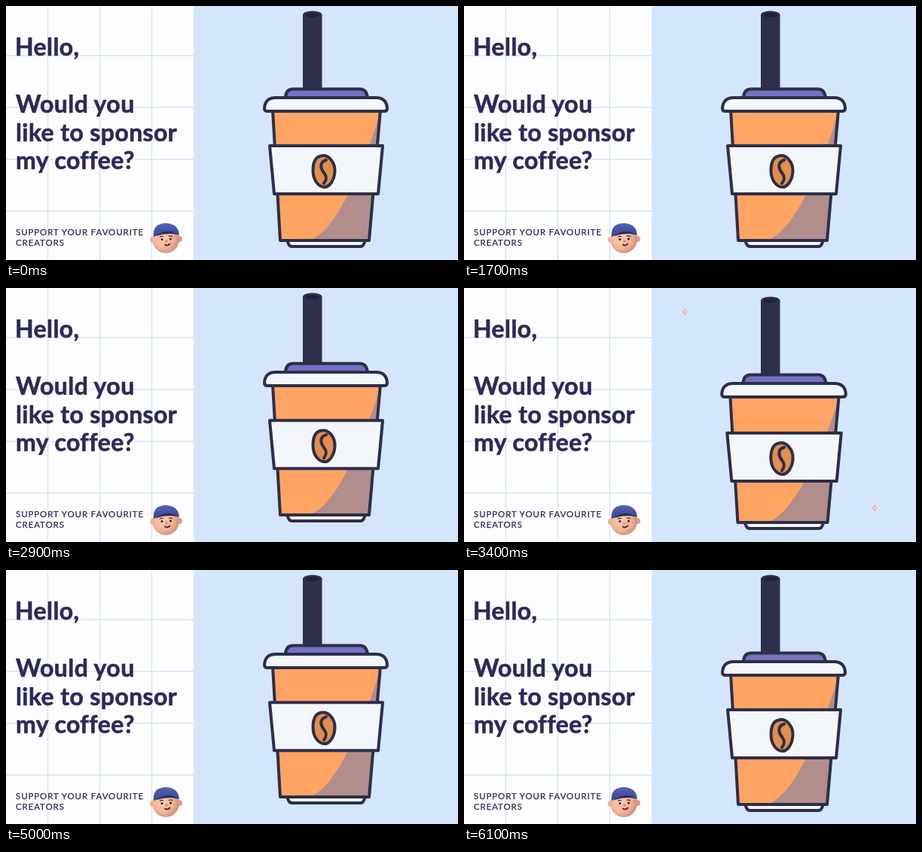
Recreate the animation shown at these times as an HTML page. Size 600 px wide and 338 px high, loop 6.2 s.

```html
<!DOCTYPE html>
<html lang="en">
<head>
<meta charset="utf-8">
<title>Sponsor my coffee</title>
<style>
  html, body { margin: 0; width: 100%; height: 100%; overflow: hidden; background: #d4e6fc; }
  svg { display: block; width: 600px; height: 338px; }
  text { font-family: Lato, "Open Sans", sans-serif; fill: #2b2a58; stroke: #2b2a58; }
  .title { font-size: 32px; font-weight: 700; letter-spacing: .4px; stroke-width: .6; }
  .note { font-size: 11.5px; letter-spacing: .9px; stroke-width: .25; }
  .ink { stroke: #2d2e49; stroke-width: 4; stroke-linejoin: round; stroke-linecap: round; }
  .ink, .ink * { vector-effect: non-scaling-stroke; }
  .white { fill: #f3f6fb; }
  #stars { stroke-linejoin: round; }
  .big { fill: #fdf5c6; stroke: #6a50cc; stroke-width: 1.6; }
  .small { fill: #fdf3c4; stroke: #f3a08c; stroke-width: 1.3; }
</style>
</head>
<body>
<svg viewBox="0 0 600 338">
  <defs>
    <radialGradient id="skin" cx=".4" cy=".45" r=".65">
      <stop offset="0" stop-color="#fbd0b6"/>
      <stop offset=".6" stop-color="#f0b296"/>
      <stop offset="1" stop-color="#c98270"/>
    </radialGradient>
    <linearGradient id="cap" x2="0" y2="1">
      <stop offset="0" stop-color="#5463b8"/>
      <stop offset="1" stop-color="#38448c"/>
    </linearGradient>
    <path id="star" vector-effect="non-scaling-stroke"
      d="M0-12.500Q2.500-3 10.500 0Q2.500 3 0 12.500Q-2.500 3-10.500 0Q-2.500-3 0-12.500Z"/>
  </defs>

  <rect width="600" height="338" fill="#d4e6fc"/>
  <rect width="249" height="338" fill="#fdfdff"/>
  <path d="M55.500 0V338M124.500 0V338M193.500 0V338M0 66H249M0 135H249M0 204H249M0 273H249"
    stroke="#d5e5fa" stroke-width="1.5"/>

  <g class="title">
    <text x="12" y="66">Hello,</text>
    <text x="13" y="142">Would you</text>
    <text x="13" y="180">like to sponsor</text>
    <text x="13" y="217">my coffee?</text>
  </g>
  <g class="note">
    <text x="13" y="305">SUPPORT YOUR FAVOURITE</text>
    <text x="13" y="319">CREATORS</text>
  </g>

  <g id="avatar">
    <ellipse cx="194.500" cy="311" rx="3.500" ry="4" fill="#eeb09a"/>
    <ellipse cx="230.500" cy="310" rx="3.500" ry="4" fill="#dd9f8c"/>
    <circle cx="212" cy="311" r="17.800" fill="url(#skin)"/>
    <path d="M196 307Q194 289 213 289Q229 290 230 305Q214 299 196 307Z" fill="url(#cap)"/>
    <path d="M199 306Q213 295 228 304Q214 301.500 199 306Z" fill="#2b2c55"/>
    <path d="M204 307.500Q206.500 305.500 209 307M216 306.500Q218.500 305 221 307" fill="none" stroke="#4a2f30" stroke-width="1.200"/>
    <circle cx="207" cy="310.500" r="1.500" fill="#2a2030"/>
    <circle cx="218.500" cy="310" r="1.500" fill="#2a2030"/>
    <circle cx="213" cy="313" r="2" fill="#e8985f"/>
    <path d="M211 317.500Q214 320 217.500 316.500" fill="none" stroke="#5a2830" stroke-width="1.800" stroke-linecap="round"/>
  </g>

  <g id="stars"></g>

  <g id="straw">
    <path d="M394 12V126H419.500V12Z" fill="#2e304a"/>
    <ellipse cx="406.750" cy="12" rx="12.750" ry="5.500" fill="#2e304a"/>
    <ellipse cx="406.750" cy="12" rx="9.500" ry="3" fill="#20213a"/>
  </g>
  <g id="base" class="ink">
    <path class="white" d="M373 312L375 316.500Q376 320 380 320H470Q474 320 475 316.500L477 312Z"/>
  </g>
  <g id="body">
    <path d="M354 138L364 312H482L497 138Z" fill="#ffa463"/>
    <path d="M497 141C480 200 437 308 400 312H482Z" fill="#b18d8c"/>
    <path class="ink" d="M354 138L364 312H482L497 138Z" fill="none"/>
  </g>
  <g id="sleeve" class="ink">
    <path class="white" d="M350 186H500L494 250H356Z"/>
    <path d="M418 199.500C428 197 437 208 436.500 220C436 232 429 241 423 241C415 241 407.500 232 407.500 219C407.500 208 411 201 418 199.500Z" fill="#e38f4c"/>
    <path d="M425 205C415 208 418 217 422 222C426 227 426 231 422 236" fill="none"/>
  </g>
  <g id="lid" class="ink">
    <path fill="#7471c4" d="M371 123Q371 110.500 381 110.500H470Q479 110.500 480 123Z"/>
    <path class="white" d="M347 140Q343 140 343 136Q344 122 358 122H491Q505 122 506 136Q506 140 502 140Z"/>
  </g>
</svg>
<script>
const LOOP = 6200, STEP = 100;
const BOUNCE = LOOP / 3, TWINKLE = 5000 / 3;
const CENTER = 424.5, FLOOR = 312, RIM = 140;

// time, base y, lid y, sleeve y, straw y, width
const bounce = [
  [0, 0, 0, 0, 0, 1],
  [100, 0, 0, 0, 0, 1],
  [433, .5, 16, 11.5, 30, 1.064],
  [620, 0, 0, 0, 8, 1.01],
  [800, -10, -10, -9.7, 0, 1],
  [867, -10, -10, -9.7, 0, 1],
  [1100, 0, 0, 0, 0, 1],
  [1220, 0, 8, 9, 8, 1.02],
  [1333, 0, 5, 7, 5, 1.01],
  [1600, 0, 0, 0, 0, 1],
  [BOUNCE, 0, 0, 0, 0, 1]
];
// time, scale
const bigPop = [[0, 0], [100, 0], [240, 1], [780, 1], [833, .95], [870, .87], [1010, 0], [TWINKLE, 0]];
const smallPop = [[0, 0], [33, 0], [67, .28], [180, .58], [790, .57], [833, .46], [960, 0], [TWINKLE, 0]];

const $ = id => document.getElementById(id);

function pose(keys, t) {
  const i = Math.max(1, keys.findIndex(k => k[0] >= t));
  const a = keys[i - 1], b = keys[i];
  const p = (t - a[0]) / (b[0] - a[0]);
  const e = p * p * (3 - 2 * p);
  return a.slice(1).map((v, n) => v + (b[n + 1] - v) * e);
}

function place(id, dy, sx = 1, sy = 1, pivot = 0) {
  $(id).setAttribute("transform",
    `translate(${CENTER} ${pivot + dy}) scale(${sx} ${sy}) translate(${-CENTER} ${-pivot})`);
}

const stars = [
  [282.5, 50, "big"], [293, 31.8, "small"],
  [555.3, 275, "big"], [545, 293, "small"]
].map(([x, y, kind]) => {
  const el = document.createElementNS("http://www.w3.org/2000/svg", "use");
  el.setAttribute("href", "#star");
  el.setAttribute("class", kind);
  $("stars").append(el);
  return { el, x, y, keys: kind === "big" ? bigPop : smallPop };
});

function draw(t) {
  const [base, lid, sleeve, straw, sx] = pose(bounce, t % BOUNCE);
  place("straw", straw);
  place("base", base, sx);
  place("body", base, sx, (FLOOR + base - RIM - lid) / (FLOOR - RIM), FLOOR);
  place("sleeve", sleeve, sx);
  place("lid", lid, sx);

  for (const { el, x, y, keys } of stars) {
    const [s] = pose(keys, t % TWINKLE);
    el.setAttribute("transform", `translate(${x} ${y}) scale(${s})`);
    el.style.display = s > .02 ? "" : "none";
  }
}

const start = performance.now();
function tick(now) {
  const t = Math.max(0, now - start) % LOOP;
  draw(Math.floor(t / STEP) * STEP);
  requestAnimationFrame(tick);
}
draw(0);
requestAnimationFrame(tick);
</script>
</body>
</html>
```
